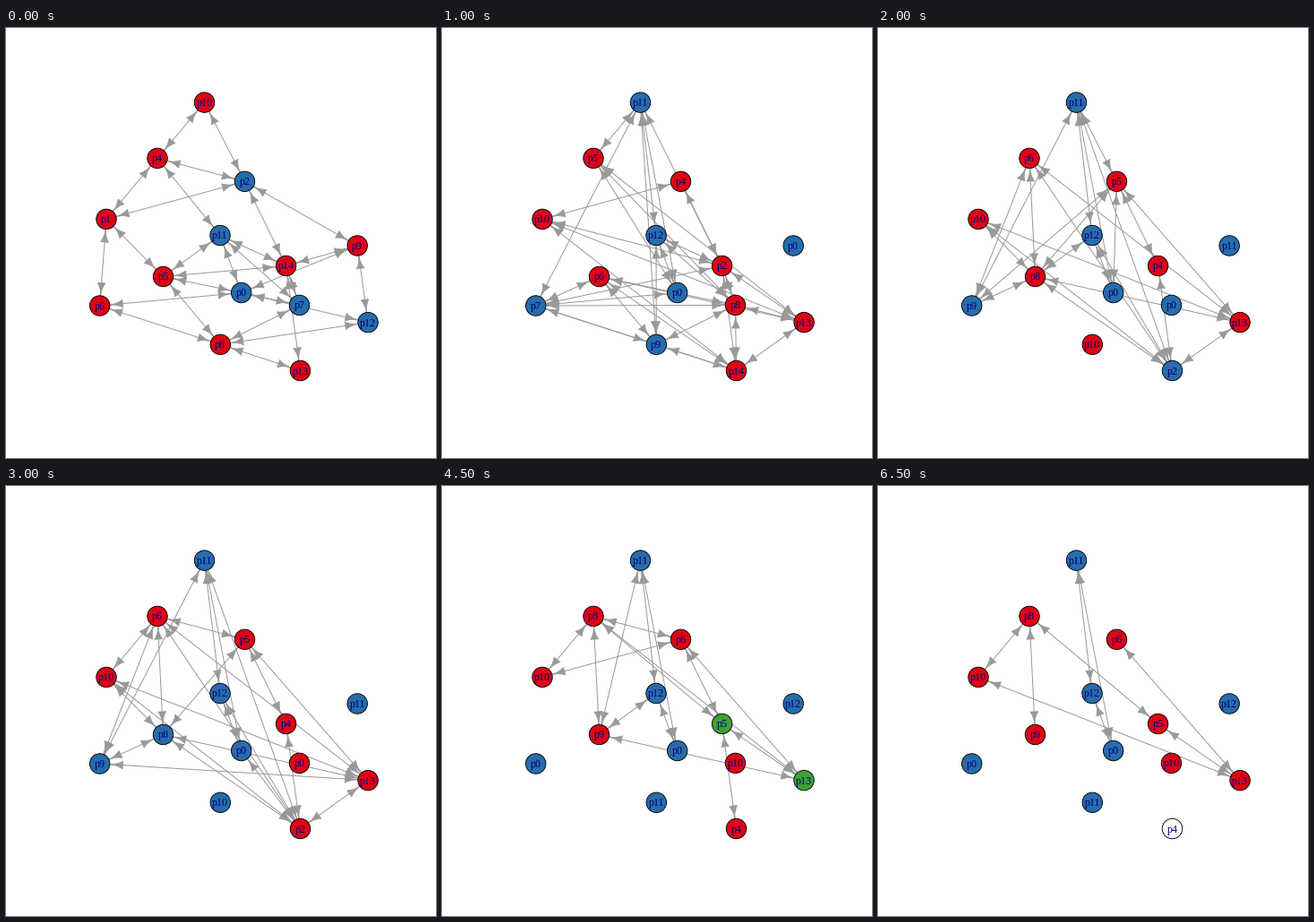
These frames come from a looping animation (480x480 px, 7 s). A matplotlib script:

```python
import numpy as np
import matplotlib.pyplot as plt
from matplotlib.animation import FuncAnimation
from matplotlib.collections import LineCollection, PolyCollection
from matplotlib.patches import Circle

SIZE, DPI = 480, 100
PX = 72 / DPI            # one pixel in points
RADIUS = 11.22
HEAD = 14.4              # arrow head length
GREY = "#999999"
FILL = {"r": "#de0315", "b": "#276cab", "g": "#3ca136", "w": "#ffffff"}

NODES = "ABCDEFGHIJKLMN"
SPOTS = [(221.5, 83.1), (169, 145.4), (266.5, 171.3), (112, 213.4),
         (239, 231.5), (392.2, 243), (312.6, 265.5), (175.5, 277.5),
         (262.7, 295.5), (104.7, 310), (327.5, 309.4), (404.1, 328.6),
         (239.3, 353.3), (328.5, 382.5)]
POS = {n: np.array(p, float) for n, p in zip(NODES, SPOTS)}

FIRST = "10 4 2 1 11 9 14 5 0 6 7 12 8 13".split()
SECOND = "11 5 4 10 12 0 2 6 0 7 8 13 9 14".split()
THIRD = "11 6 5 10 12 11 4 8 0 9 0 13 10 2".split()
FOURTH = "11 8 6 10 12 12 5 9 0 0 10 13 11 4".split()


def edit(links, drop="", add=""):
    gone = drop.split()
    return [e for e in links if e not in gone] + add.split()


LINKS_1 = ("AB AC BC BD BE CD CG CF DH DJ EH EG EI EK HG HI HM JI JM "
           "IF FG FL IK IL GK GN KM ML MN").split()
LINKS_2 = ("AB AJ AE AI AM AG BI BK BL CD CG DG DL DN EM EI EG EK GK GN GL "
           "HJ HK HL HM HN JG JI JK JM JN KL KM KN LN MN").split()
LINKS_3 = ("AJ AC AE AI AN BJ BH BN BL CG CL CI CH CJ DH DN DL EH EI EN "
           "GN HJ HN HL LN").split()
LINKS_4 = ("AJ AE AI AN BD BC BH BJ BL BN CG CH CL DH DN DL EI EN GN "
           "HJ HN HL JL LN IN").split()
LINKS_5 = "AH AE AI BD BC BH BG BL CD CG CL EH EI HL GL GN".split()
LINKS_6 = "AH AE AI BD BC BH BG BL CD CH CL DL EI HL GL".split()
LINKS_7 = "AE AI BD BH BG CL DL EI GL".split()

# labels, fills in node order, links
STEPS = [
    (FIRST, "rrbrbrrrbrbbrr", LINKS_1),
    (FIRST, "brrrbrrrbbrrbr", edit(LINKS_1, "BE CF IF EH", "EL AN MG HN")),
    (SECOND, "brrrbbrrbbrrbr", LINKS_2),
    (SECOND, "brrrbbrrbrrrbb", edit(LINKS_2, "JK HJ EM KN HN", "BM DK")),
    (THIRD, "brrrbbrrbbbrrb", LINKS_3),
    (THIRD, "brbrbbrrbrrrbg", edit(LINKS_4, "JL IN", "CI EH")),
    (THIRD, "brrrbbrbbbrrbr", LINKS_4),
    (FOURTH, "brrrbbrbbbrrbg", edit(LINKS_5, "EH", "CH DL")),
    (FOURTH, "brrrbbrrbbrrbb", edit(LINKS_5, "EH", "DL")),
    (FOURTH, "brrrbbgrbbrgbr", LINKS_5),
    (FOURTH, "brrrbbrrbbrrrw", edit(LINKS_5, "GN CG", "DL")),
    (FOURTH, "brrrbbrbbbrbbw", LINKS_6),
    (FOURTH, "brrbbbrbbbrrbw", edit(LINKS_6, "BC CD HL")),
    (FOURTH, "brrrbbrrbbrrbw", LINKS_7),
]

fig = plt.figure(figsize=(SIZE / DPI, SIZE / DPI), dpi=DPI, facecolor="white")
ax = fig.add_axes([0, 0, 1, 1])
ax.set_xlim(0, SIZE)
ax.set_ylim(SIZE, 0)
ax.axis("off")

lines = LineCollection([], colors=GREY, linewidths=1.0 * PX, zorder=1)
heads = PolyCollection([], facecolors=GREY, edgecolors=GREY,
                       linewidths=0.75 * PX, zorder=2)
ax.add_collection(lines, autolim=False)
ax.add_collection(heads, autolim=False)

discs, names = [], []
for n in NODES:
    x, y = POS[n]
    discs.append(ax.add_patch(Circle((x, y), RADIUS, ec="black",
                                     lw=0.9 * PX, zorder=3)))
    names.append(ax.text(x, y + 4, "", family="Liberation Serif",
                         fontsize=12 * PX, color="#00007a", ha="center",
                         va="baseline", zorder=4))


def arrow_head(tip, unit):
    """Head with parabolic sides, pointing along unit."""
    back = HEAD * np.sqrt(np.linspace(0, 1, 9))
    half = 0.3 * HEAD * (back / HEAD) ** 2 + 0.07
    side = np.array([-unit[1], unit[0]])
    spine = tip - np.outer(back, unit)
    wing = np.outer(half, side)
    return np.vstack([(spine + wing)[::-1], spine - wing])


def draw(i):
    labels, fills, links = STEPS[i]
    segs, polys = [], []
    for a, b in links:
        p, q = POS[a], POS[b]
        unit = (q - p) / np.hypot(*(q - p))
        start, end = p + RADIUS * unit, q - RADIUS * unit
        segs.append([start, end])
        polys += [arrow_head(end, unit), arrow_head(start, -unit)]
    lines.set_segments(segs)
    heads.set_verts(polys)
    for disc, name, label, fill in zip(discs, names, labels, fills):
        disc.set_facecolor(FILL[fill])
        name.set_text("p" + label)
    return [lines, heads, *discs, *names]


anim = FuncAnimation(fig, draw, frames=len(STEPS), interval=500,
                     init_func=lambda: draw(0), repeat=True, repeat_delay=0)
plt.show()
```
